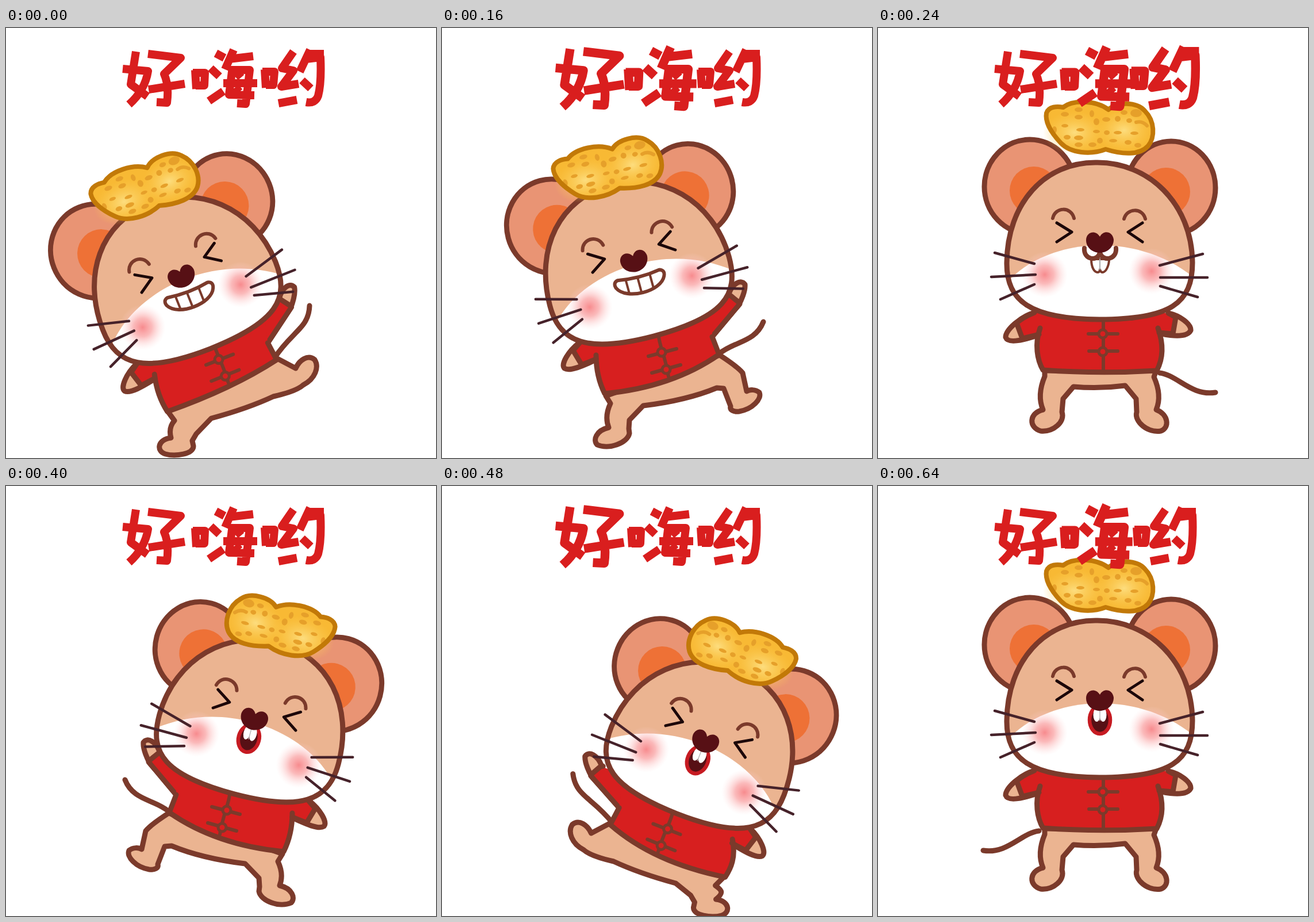
An HTML page that plays this animation: 748x748 px, repeating every 0.72 s.

```html
<!DOCTYPE html>
<html lang="zh">
<head>
<meta charset="utf-8">
<title>好嗨哟</title>
<style>
html, body { margin: 0; width: 100%; height: 100%; overflow: hidden; background: #fff; }
svg { display: block; width: 100vw; height: 100vh; }
</style>
</head>
<body>
<svg viewBox="0 0 748 748" role="img" aria-label="好嗨哟">
  <defs>
    <radialGradient id="blush">
      <stop offset="0" stop-color="#f78b8e"/>
      <stop offset=".4" stop-color="#f99c9d" stop-opacity=".7"/>
      <stop offset="1" stop-color="#fdd" stop-opacity="0"/>
    </radialGradient>
    <radialGradient id="glow">
      <stop offset="0" stop-color="#fddd7e"/>
      <stop offset="1" stop-color="#fbc94f" stop-opacity="0"/>
    </radialGradient>
    <clipPath id="skull"><path id="skullPath"/></clipPath>
  </defs>
  <g id="mouse" stroke-linecap="round" stroke-linejoin="round"></g>
  <g id="words" fill="none" stroke="#d91e1e" stroke-width="14" stroke-linejoin="round"></g>
</svg>
<script>
const BROWN = '#7b3a2b', SKIN = '#ebb491', RED = '#d71f1f', DARK = '#571015';
const STEP = 80;
const $ = id => document.getElementById(id);

const path = (d, stroke = BROWN, width = 9, fill = 'none') =>
  `<path d="${d}" fill="${fill}" stroke="${stroke}" stroke-width="${width}"/>`;
const oval = (x, y, rx, ry, fill, stroke = 'none', width = 0) =>
  `<ellipse cx="${x}" cy="${y}" rx="${rx}" ry="${ry}" fill="${fill}" stroke="${stroke}" stroke-width="${width}"/>`;
const group = (transform, body) => `<g transform="${transform}">${body}</g>`;

// ---- head, drawn upright; the pivot lies between the eyes at (386,355)
const HEAD = 'M380 234C470 233 546 305 547 408C547 478 510 507 385 507C265 506 223 475 224 408C225 305 290 233 380 234Z';
$('skullPath').setAttribute('d', HEAD);

const ears =
  oval(264, 276, 79, 82, '#e99474', BROWN, 9) + oval(271, 283, 42, 42, '#ee7136') +
  oval(510, 278, 77, 81, '#e99474', BROWN, 9) + oval(501, 285, 42, 42, '#ee7136');

const mouths = {
  grin:
    path('M349 397Q388 404 424 398Q434 401 429 411C418 435 355 435 343 409Q340 399 349 397Z', BROWN, 6, '#fff') +
    path('M363 401V425M384 402V428M406 402V425', BROWN, 4),
  buck:
    path('M371 402C371 418 377 425 382 425Q386 425 386 420Q387 425 391 425C397 424 402 413 402 402Z', BROWN, 4, '#fff') +
    path('M386 402V420', '#aaa', 2) +
    path('M359 383C357 402 381 408 386 391C392 408 416 402 414 383', BROWN, 8, '#fff'),
  open:
    oval(386, 407, 18, 24, DARK, '#c61b22', 6.5) +
    oval(380.5, 398, 6, 12, '#fff') + oval(391.5, 398, 6, 12, '#fff') +
    path('M386 390V408', '#bbb', 1.5)
};

const head = mouth =>
  ears + path(HEAD, 'none', 0, SKIN) +
  `<g clip-path="url(#skull)">${path('M222 446C256 404 320 378 386 378C452 378 508 400 552 436V520H222Z', 'none', 0, '#fff')}</g>` +
  oval(290, 429, 40, 40, 'url(#blush)') + oval(476, 423, 40, 40, 'url(#blush)') +
  path(HEAD) + mouths[mouth] +
  path('M386 363C378 350 362 355 362 369C362 384 376 391 386 391C398 391 410 382 410 368C408 353 392 351 386 363Z', 'none', 0, DARK) +
  path('M304 331C308 311 336 310 341 331M428 332C433 313 460 312 465 332', BROWN, 6) +
  path('M311 339L337 355L311 372M460 339L435 355L460 372', '#1c0709', 5) +
  path('M203 391L272 410M197 433L274 429M213 472L272 446M490 413L565 393M491 434H573M491 449L556 468', '#46222a', 4.5);

// ---- peanut: x, y, half width, half height of each pit
const PITS = [
  [325,150,7,4], [349,142,7,4], [349,155,7,4], [372,149,4,6], [380,163,5,6], [397,159,7,4],
  [417,158,5,5], [428,147,6,4], [449,148,10,7], [437,161,5,4], [307,177,4,6], [325,170,6,3],
  [352,177,7,3], [329,190,6,4], [349,191,8,4], [349,203,7,4], [373,203,7,4], [380,180,6,3],
  [398,182,5,4], [417,182,7,3], [386,196,5,5], [409,196,7,3], [435,199,6,4], [446,183,7,3], [452,204,6,4]
];
const NUT = 'M322 138C340 124 380 126 401 142C415 128 450 128 464 144C482 162 482 190 470 205C455 222 425 220 396 211C370 221 335 218 318 200C303 184 290 164 293 148C297 136 312 136 322 138Z';
const peanut =
  path(NUT, 'none', 0, '#f8b934') +
  oval(342, 182, 55, 38, 'url(#glow)') + oval(428, 178, 50, 38, 'url(#glow)') +
  PITS.map(p => oval(...p, '#e6a02a')).join('') +
  path('M449 164Q460 161 468 170', '#e6a02a', 6) +
  path(NUT, '#c27908', 8);

// ---- shirts with arms: upright and dancing
const knot = (x, y) => oval(x, y, 7, 7, RED, BROWN, 5);

const calmTop =
  path('M272 495C248 502 222 525 222 538C226 549 250 544 280 534M505 496C525 500 545 515 544 526C538 538 515 537 489 531', BROWN, 9, SKIN) +
  path('M272 495Q252 502 241 513L251 541L282 532C272 550 277 578 287 595Q385 602 485 596C496 575 497 550 488 530L513 533L518 503L505 496Z', 'none', 0, RED) +
  path('M272 495Q254 502 241 513L251 540L280 533M505 496L518 503L513 532L489 530') +
  path('M282 522C272 550 277 578 287 595Q385 602 485 596C496 575 497 550 487 522') +
  path('M392 508V594M366 532H417M367 562H417', BROWN, 6) + knot(391, 532) + knot(391, 563);

// lift raises the hem, spread widens the planted side, swing turns the raised arm
function danceTop(lift, spread, swing) {
  const hem = `C${268 - spread} 600 ${275 - spread} 620 ${283 - spread} 636Q400 ${625 - 2 * lift} 482 568L470 537`;
  const arm =
    path('M499 462C505 445 520 436 527 446C528 458 520 475 516 482L470 537', BROWN, 9, SKIN) +
    path('M470 537L517 478L499 464L420 500Z', 'none', 0, RED) +
    path('M496 464L500 464L516 477M518 480L470 537');
  return path('M238 548C220 562 206 585 213 592C222 598 245 588 268 577', BROWN, 9, SKIN) +
    group(`rotate(${swing} 470 537)`, arm) +
    path(`M238 548L228 562L243 586L268 575${hem}L470 470L380 490Z`, 'none', 0, RED) +
    path('M240 547L228 561L243 586L268 576') +
    path('M268 569' + hem) +
    group(`translate(0 ${-lift})`,
      path('M377 537C379 555 388 570 394 606M359 571L408 558M365 600L415 586', BROWN, 6) + knot(382, 564) + knot(390, 594));
}

// ---- legs; s pushes the planted foot up, w moves its thigh outwards
const poses = {
  mid: {
    x: 386, y: 355, turn: 0, tail: 'M490 600C520 603 545 641 587 634', root: '490 600',
    legs: () => 'M290 596L290 606C280 630 281 650 287 664C262 670 262 695 283 701C305 703 326 685 320 668L322 645L340 624Q385 628 430 622L449 645L450 668C445 685 470 705 492 701C508 695 505 672 484 664C492 645 488 625 480 607L484 596Z'
  },
  soft: {
    x: 330, y: 389, turn: -15.2, tail: 'M559 511C545 547 508 545 483 566', root: '486 568',
    legs: s => `M285 640L293 653C285 670 286 ${685 - s} 290 ${695 - s}c-22 5 -28 22 -20 30c20 9 53 -3 56 -20l-1 -8l1 -15L350 657Q425 648 478 626L490 627L502 658C500 665 508 668 517 667C540 663 557 645 552 634C545 628 535 629 530 632L523 600C515 590 500 580 483 569Z`
  },
  hard: {
    x: 299.5, y: 416.5, turn: -21.7, tail: 'M528 483C527 522 497 528 467 574', root: '467 574',
    legs: (s, w) => `M${280 - w} 665L${293 - w / 2} 683C${285 - w} 692 ${284 - w} ${702 - s} 287 ${713 - s}c-25 3 -25 24 -10 28c18 5 50 0 49 -14l-2 -9l7 -12L357 679Q420 662 465 641Q505 632 517 621C538 610 545 590 537 577C525 567 510 578 504 592L470 574Z`
  }
};

// ---- one entry per beat; "big" lists the swollen characters
const beats = [
  { pose: 'hard', mouth: 'grin', big: '', lift: 8 },
  { pose: 'hard', mouth: 'grin', big: '好', lift: 8, dy: -22 },
  { pose: 'soft', mouth: 'grin', big: '好嗨' },
  { pose: 'mid', mouth: 'buck', big: '嗨哟', nut: [0, 0] },
  { pose: 'soft', mouth: 'open', big: '哟', flip: 1, dx: 4, dy: 23.5, squash: 9, nut: [-4, 12], wag: -5 },
  { pose: 'soft', mouth: 'open', big: '', flip: 1, dx: 4 },
  { pose: 'hard', mouth: 'open', big: '好', flip: 1, dx: 1.5, dy: 12, squash: 6, spread: 10, swing: 8, wag: 5 },
  { pose: 'hard', mouth: 'open', big: '嗨', flip: 1, dx: 2, dy: -22, spread: 10, swing: 8, wag: 5 },
  { pose: 'mid', mouth: 'open', big: '嗨', nut: [0, 0], tailFlip: 1 }
];

function mouse({ pose, mouth, flip, dx = 0, dy = 0, squash = 0, lift = 0, spread = 0, swing = 0,
                 nut = [-1, 32], wag = 0, tailFlip }) {
  const p = poses[pose];
  const tail = group(tailFlip ? 'translate(770 0) scale(-1 1)' : `rotate(${wag} ${p.root})`, path(p.tail));
  const top = pose === 'mid' ? calmTop
    : group(`translate(${p.x} ${p.y}) rotate(${p.turn + 15.2}) translate(-330 -389)`, danceTop(lift, spread, swing));
  const skull = group(`translate(${p.x} ${p.y}) rotate(${p.turn}) translate(-386 -355)`,
    head(mouth) + group(`translate(${nut})`, peanut));
  return group(flip ? `translate(${762 + dx} ${dy}) scale(-1 1)` : `translate(${dx} ${dy})`,
    tail + path(p.legs(squash, spread), BROWN, 9, SKIN) + top + skull);
}

// ---- brush lettering: centre x and strokes
const glyphs = {
  好: [257, 'M226 41L217 98L246 119M203 71L247 75Q242 108 214 133M247 45L304 52L275 80Q284 100 280 130L262 129M248 107L311 97'],
  嗨: [380, 'M329 73L331 106M325 78H346L345 100H330M365 44L380 52M356 70L371 84M353 127L378 110M396 38L381 72M388 54L430 49M394 68L388 116L432 117M390 73H424L417 132L402 131M378 96H437M402 78L409 86M399 103L406 111'],
  哟: [499, 'M450 72L452 104M446 76H467L465 99H452M500 41L480 70L500 74L479 102L509 97M474 131L506 125M529 38L511 76M529 45H553M522 54L547 51Q549 95 543 118Q538 132 522 129M515 91L530 105']
};

const words = big => Object.entries(glyphs).map(([c, [x, d]]) =>
  group(`translate(${x} 87) scale(${big.includes(c) ? 1.1 : 1}) translate(${-x} -87)`, `<path d="${d}"/>`)).join('');

let shown = -1;
function tick(now) {
  const i = Math.floor(now / STEP) % beats.length;
  if (i !== shown) {
    shown = i;
    $('mouse').innerHTML = mouse(beats[i]);
    $('words').innerHTML = words(beats[i].big);
  }
  requestAnimationFrame(tick);
}
tick(0);
</script>
</body>
</html>
```
